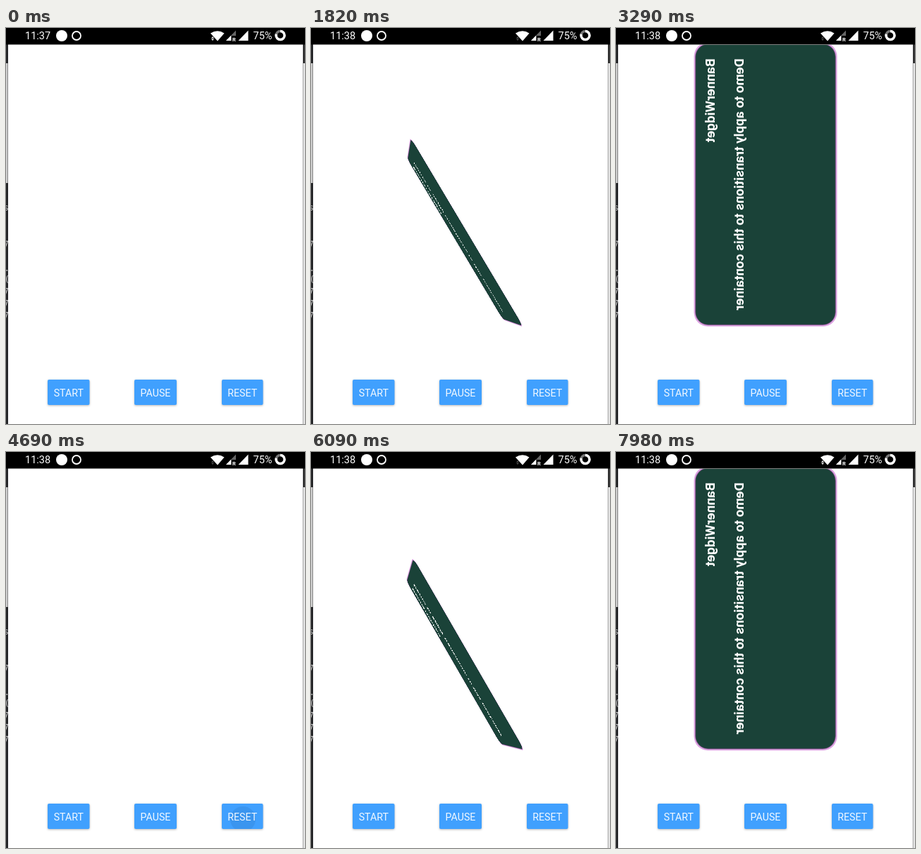
These frames come from a looping animation (424 px wide and 562 px high, 8000 ms). An HTML page:

```html
<!DOCTYPE html>
<html lang="en">
<head>
<meta charset="utf-8">
<title>Banner transition</title>
<style>
  html, body { margin: 0; width: 100%; height: 100%; overflow: hidden; background: #fff; }
  body { position: relative; font-family: Roboto, "Noto Sans", sans-serif; }
  svg { display: block; overflow: visible; }
  .screen { position: absolute; left: 0; top: 0; }
  .app { position: absolute; left: 3px; top: 23.5px; width: 418px; height: 538.5px; overflow: hidden; pointer-events: none; }

  /* Centre of the resting card is (212, 222) on the stage. */
  .mover { position: absolute; left: 8px; top: 97.5px; width: 402px; height: 202px; animation: turn 8s infinite; }
  .card { animation: grow 8s infinite; }
  .card text { font-weight: 700; font-size: 18.75px; fill: #fff; }

  @keyframes turn {
    0%, 15.34% {
      transform: translateY(214px) perspective(850px) rotate(0deg) rotateX(-60deg);
      animation-timing-function: ease-in-out;
    }
    27.84%, 57.74% {
      transform: translateY(0) perspective(850px) rotate(90deg) rotateX(180deg);
      animation-timing-function: step-end;
    }
    57.75%, 68.65% {
      transform: translateY(214px) perspective(850px) rotate(0deg) rotateX(-60deg);
      animation-timing-function: ease-in-out;
    }
    81.15%, 100% { transform: translateY(0) perspective(850px) rotate(90deg) rotateX(180deg); }
  }
  @keyframes grow {
    0%, 15.34% { transform: scale(0); animation-timing-function: cubic-bezier(.4, 0, .51, 1); }
    27.84%, 57.74% { transform: scale(1); animation-timing-function: step-end; }
    57.75%, 68.65% { transform: scale(0); animation-timing-function: cubic-bezier(.4, 0, .51, 1); }
    81.15%, 100% { transform: scale(1); }
  }

  .btn rect { fill: #40a0fe; filter: drop-shadow(0 1.5px 1.5px rgba(0, 0, 0, .28)); }
  .btn text { font-size: 14.2px; fill: #f1f8ff; text-anchor: middle; }
  .ripple { fill: #1d5fa8; opacity: 0; }
  .start .ripple { animation: tapStart 8s infinite; }
  .reset .ripple { animation: tapReset 8s infinite; }
  @keyframes tapStart {
    0%, 15% { opacity: 0; }
    15.75%, 16.5% { opacity: .3; }
    19.5%, 68% { opacity: 0; }
    69%, 69.5% { opacity: .3; }
    72.5%, 100% { opacity: 0; }
  }
  @keyframes tapReset {
    0%, 56% { opacity: 0; }
    57%, 58% { opacity: .3; }
    60.4%, 100% { opacity: 0; }
  }

  .bar text { font-size: 14.5px; fill: #fff; }
  .before { animation: before 8s step-end infinite; }
  .after { animation: after 8s step-end infinite; }
  .traffic { animation: traffic 8s step-end infinite; }
  @keyframes before { 0% { opacity: 1; } 19.25%, 100% { opacity: 0; } }
  @keyframes after { 0% { opacity: 0; } 19.25%, 100% { opacity: 1; } }
  @keyframes traffic { 0% { opacity: 1; } 10.5% { opacity: .3; } 87.5%, 100% { opacity: 1; } }
</style>
</head>
<body>
<svg class="screen" width="424" height="562" viewBox="0 0 424 562">
  <!-- desktop edges behind the phone window -->
  <path fill="#252628" d="M0 23h3v539H0z"/>
  <path fill="#cdcdcd" d="M0 50h2v170H0z"/>
  <path fill="#858585" d="M2 50h1v170H2z"/>
  <path fill="#e4e4e4" d="M421 23h3v539h-3z"/>
  <path fill="#333" d="M421 23h3v27h-3z"/>
  <path fill="#8a8a8a" d="M420.5 50h1v512h-1z"/>
  <g font-family="'DejaVu Sans Mono', monospace" font-size="12" fill="#c4c4c4" text-anchor="end">
    <text x="4" y="259">s</text><text x="4" y="311">7</text><text x="5" y="345">.</text>
    <text x="5" y="361">(</text><text x="4" y="378">7</text><text x="4" y="395">7</text><text x="4" y="412">7</text>
  </g>
  <path fill="#fff" d="M3 23h417.5v539H3z"/>

  <g class="bar">
    <path d="M0 0h424v23.500H0z"/>
    <text class="before" x="27" y="16">11:37</text>
    <text class="after" x="27" y="16">11:38</text>
    <circle cx="79" cy="11" r="8" fill="#fff"/>
    <circle cx="100" cy="11" r="6" fill="none" stroke="#fff" stroke-width="1.8"/>
    <path fill="#fff" d="M290 7.5Q300 1 309.500 7.500L300 18.500z"/>
    <path class="traffic" fill="#fff" d="M291 14.500l2-2.500 2 2.500zM291 15.500h4l-2 2.500z"/>
    <path fill="#666" d="M326 3.500V18h-14z"/>
    <path fill="#fff" d="M319 10.800V18h-7z"/>
    <path d="M320 11h7v8h-7z"/>
    <text x="321" y="18.500" style="font-size:7.500px;font-weight:700">R</text>
    <path fill="#fff" d="M343.500 3.500V18H329.500z"/>
    <text x="350.500" y="16">75%</text>
    <g fill="none" stroke-width="3.4" transform="rotate(-90 389 10.500)">
      <circle cx="389" cy="10.500" r="6" stroke="#777"/>
      <circle cx="389" cy="10.500" r="6" stroke="#fff" pathLength="100" stroke-dasharray="80 20"/>
    </g>
  </g>

  <clipPath id="face"><rect width="59.500" height="36" rx="2"/></clipPath>
  <g class="btn start" transform="translate(59 499)">
    <rect width="59.500" height="36" rx="2"/>
    <g clip-path="url(#face)"><circle class="ripple" cx="25" cy="23" r="18"/></g>
    <text x="29.800" y="23.500">START</text>
  </g>
  <g class="btn" transform="translate(182 499)">
    <rect width="60" height="36" rx="2"/>
    <text x="30" y="23.500">PAUSE</text>
  </g>
  <g class="btn reset" transform="translate(306 499)">
    <rect width="58.500" height="36" rx="2"/>
    <g clip-path="url(#face)"><circle class="ripple" cx="30" cy="22" r="18"/></g>
    <text x="29.200" y="23.500">RESET</text>
  </g>
</svg>

<div class="app">
  <div class="mover">
    <svg class="card" width="402" height="202" viewBox="0 0 402 202">
      <rect x="-.6" y="-.6" width="403.200" height="203.200" rx="20" fill="#dda3e2"/>
      <rect x="1.800" y="1.800" width="398.400" height="198.400" rx="18" fill="#1a4238" stroke="#6b4575" stroke-width=".8"/>
      <text x="22.200" y="28.600">BannerWidget</text>
      <text x="22.200" y="69.600">Demo to apply transitions to this container</text>
    </svg>
  </div>
</div>
</body>
</html>
```
